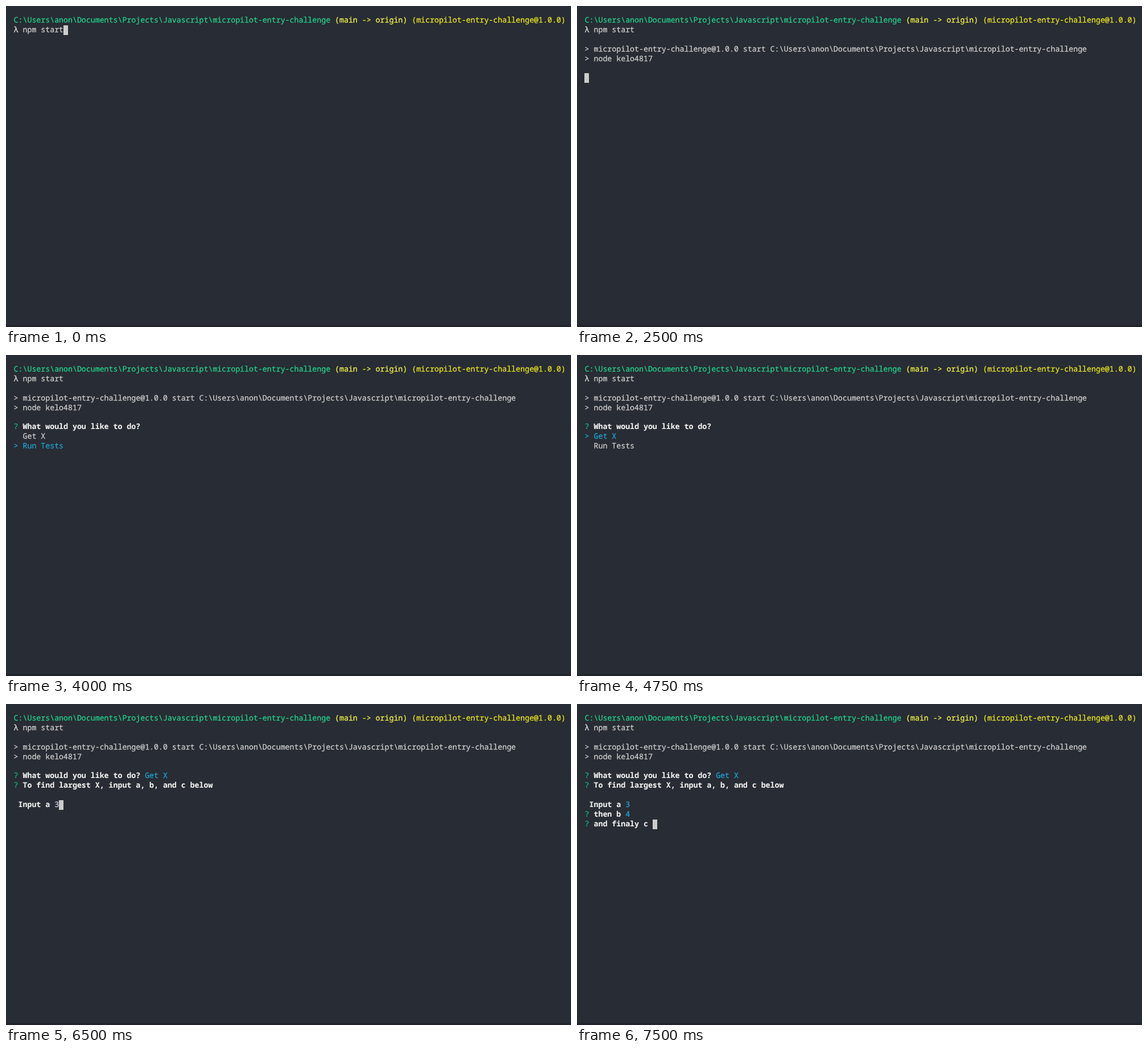
Write an HTML page that moves like this. It is 993x564 px and loops after 8 s.

```html
<!DOCTYPE html>
<html lang="en">
<head>
<meta charset="utf-8">
<title>Terminal session</title>
<style>
  html, body { margin: 0; height: 100%; overflow: hidden; background: #282c34; }
  svg { display: block; width: 100vw; height: 100vh; }
  text {
    font: 13.25px "Noto Sans Mono", "DejaVu Sans Mono", monospace;
    font-variant-ligatures: none;
    text-rendering: geometricPrecision;
    white-space: pre;
    fill: currentColor;
    stroke: currentColor;
    stroke-width: 0.3px;
    color: #ccc;
  }
  .path { color: #23d18b; }
  .branch { color: #f5f543; }
  .package { color: #e9e51c; }
  .mark { color: #16b678; }
  .choice { color: #1fa3d0; }
  .dim { color: #84878b; }
  .bright { color: #e5e5e5; }
  .bold { color: #eee; font-weight: 700; stroke-width: 0.15px; }
  .cursor { fill: #ccc; }
  .edge { fill: #21252b; }
</style>
</head>
<body>
<svg viewBox="0 0 993 564">
  <rect class="edge" y="560.5" width="993" height="3.5"/>
  <g id="screen"></g>
</svg>
<script>
const LOOP = 8000, CELL = 7.95, LINE = 16.88, LEFT = 13.6, BASE = 29;
const screen = document.getElementById('screen');
const project = 'micropilot-entry-challenge';
const folder = 'C:\\Users\\anon\\Documents\\Projects\\Javascript\\' + project;

const baseline = row => Math.round(BASE + row * LINE);
const run = (row, col, text, style = '') =>
  `<text class="${style}" x="${LEFT + col * CELL}" y="${baseline(row)}">${text}</text>`;
const cursor = (row, col) =>
  `<rect class="cursor" x="${Math.round(LEFT + col * CELL - 0.2)}" y="${baseline(row) - 12}" width="8" height="17"/>`;
const ask = (row, text) => run(row, 0, '?', 'mark') + run(row, 2, text, 'bold');

const command =
  run(0, 0, folder, 'path') +
  run(0, 71, '(main -> origin)', 'branch') +
  run(0, 88, `(${project}@1.0.0)`, 'package') +
  run(1, 0, 'λ', 'bright') + run(1, 2, 'npm start');
const started = command +
  run(3, 0, `> ${project}@1.0.0 start ${folder}`) +
  run(4, 0, '> node kelo4817');
const question = started + ask(6, 'What would you like to do?');

const menu = selected => question + ['Get X', 'Run Tests'].map((label, i) =>
  i === selected ? run(7 + i, 0, '> ' + label, 'choice') : run(7 + i, 2, label)).join('');

const form = question + run(6, 29, 'Get X', 'choice') +
  ask(7, 'To find largest X, input a, b, and c below') +
  run(9, 1, 'Input a', 'bold');
const formB = form + run(9, 9, '3', 'choice') + ask(10, 'then b');
const formC = formB + run(10, 9, '4', 'choice') + ask(11, 'and finaly c');

// [start time in ms, screen content]
const scenes = [
  [0, command + cursor(1, 11)],
  [750, command + cursor(2, 0)],
  [2500, started + cursor(6, 0)],
  [3250, menu(0) + run(6, 29, '(Use arrow keys)', 'dim')],
  [4000, menu(1)],
  [4500, started],
  [4750, menu(0)],
  [5250, form + cursor(9, 9)],
  [6500, form + run(9, 9, '3') + cursor(9, 10)],
  [6750, formB + cursor(10, 9)],
  [7250, formB + run(10, 9, '4') + cursor(10, 10)],
  [7500, formC + cursor(11, 15)],
];

const origin = performance.now();
let shown;
function draw() {
  const time = (performance.now() - origin) % LOOP;
  const scene = scenes.findLast(([start]) => start <= time);
  if (scene !== shown) {
    shown = scene;
    screen.innerHTML = scene[1];
  }
  requestAnimationFrame(draw);
}
draw();
</script>
</body>
</html>
```
